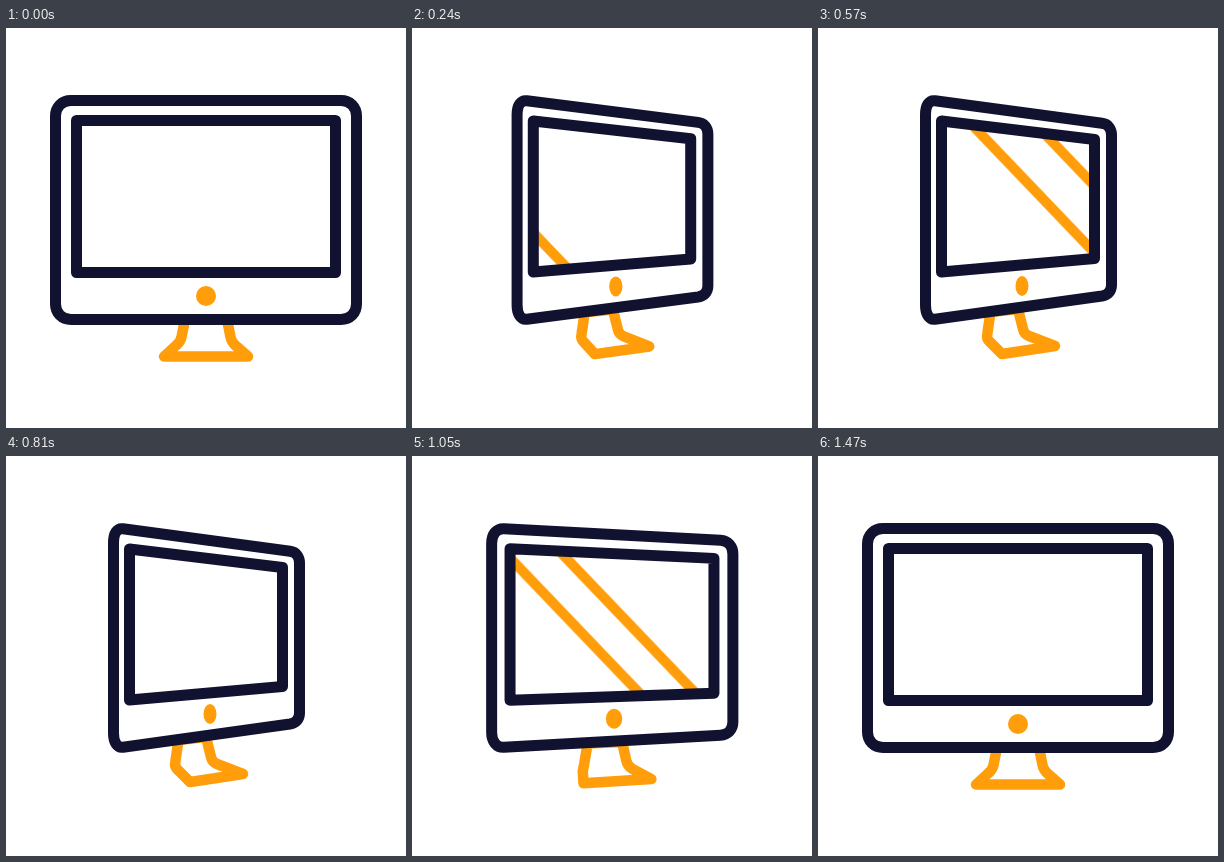
Recreate the animation shown at these times as an HTML page without scripts. Size 400 px wide and 400 px high, loop 3.62 s.

```html
<!DOCTYPE html>
<html lang="en">
<head>
<meta charset="utf-8">
<title>Turning monitor</title>
<style>
  html, body { margin: 0; width: 100%; height: 100%; overflow: hidden; background: #fff; }
  svg { display: block; width: 100%; height: 100%; }

  path { fill: none; stroke-linecap: round; stroke-linejoin: round; }
  .dark { stroke: #111130; stroke-width: 11; }
  .warm { stroke: #ff9d0a; stroke-width: 10.5; }

  /* Each part morphs between a front pose and a turned pose. */
  .part { d: var(--front); animation: turn 3.62s infinite; }
  .case {
    --front: path("M49.5 88 C49.5 79 56 72.5 65 72.5 L335 72.5 C344 72.5 350.5 79 350.5 88 L350.5 276 C350.5 285 344 291.5 335 291.5 L65 291.5 C56 291.5 49.5 285 49.5 276 Z");
    --turned: path("M107.5 87 C107.5 77 111 72 117 72.8 L284 95.3 C290 96 293.5 101 293.5 107 L293.5 257 C293.5 263 290 267 284 268 L117 291.2 C111 292 107.5 286 107.5 277 Z");
  }
  .screen {
    --front: path("M70.5 92.5 L329.5 92.5 L329.5 244.5 L70.5 244.5 Z");
    --turned: path("M123.5 93 L276.5 111.5 L276.5 230.5 L123.5 244 Z");
  }
  .stand {
    --front: path("M179 291.5 L175.5 309 Q174.5 314 170 317.5 L158 328.5 L242 328.5 L229.5 317.5 Q225.5 314 224.5 309 L221 291.5 Z");
    --turned: path("M172.5 284 L169.3 306 Q168.3 311 171.5 313.5 L184 326 L237 318 L211 308 Q206 306 205 301 L200 281 Z");
  }
  .button {
    fill: #ff9d0a;
    --front: path("M190 268 a10 10 0 1 1 20 0 a10 10 0 1 1 -20 0 Z");
    --turned: path("M197.5 258 a6.5 10 0 1 1 13 0 a6.5 10 0 1 1 -13 0 Z");
  }

  @keyframes turn {
    0% { d: var(--front); animation-timing-function: cubic-bezier(.5, 0, .5, 1); }
    7.96% { d: var(--turned); animation-timing-function: linear; }
    24.97% { d: var(--turned); animation-timing-function: cubic-bezier(.5, 0, .5, 1); }
    33.26%, 100% { d: var(--front); }
  }

  /* Two passes of light across the glass. */
  .glint { stroke-width: 10; animation: 3.62s linear infinite; }
  .first { animation-name: first; }
  .second { animation-name: second; }

  @keyframes first {
    0% { transform: translateX(-132px); }
    10.77% { transform: translateX(111px); animation-timing-function: cubic-bezier(.33, .38, .67, .72); }
    22.1% { transform: translateX(335px); }
    22.2%, 100% { transform: translateX(500px); }
  }
  @keyframes second {
    0%, 18.04% { transform: translateX(-130px); }
    33.98% { transform: translateX(275px); animation-timing-function: cubic-bezier(.33, .46, .67, .85); }
    40.88%, 100% { transform: translateX(400px); }
  }
</style>
</head>
<body>
<svg viewBox="0 0 400 400">
  <clipPath id="glass"><path class="part screen"/></clipPath>
  <path class="part stand warm"/>
  <g clip-path="url(#glass)">
    <path class="glint first warm" d="M-57.4 37 L191.4 297 M-121.4 37 L127.4 297"/>
    <path class="glint second warm" d="M-57.4 37 L191.4 297 M-113.4 37 L135.4 297"/>
  </g>
  <path class="part case dark"/>
  <path class="part screen dark"/>
  <path class="part button"/>
</svg>
</body>
</html>
```
